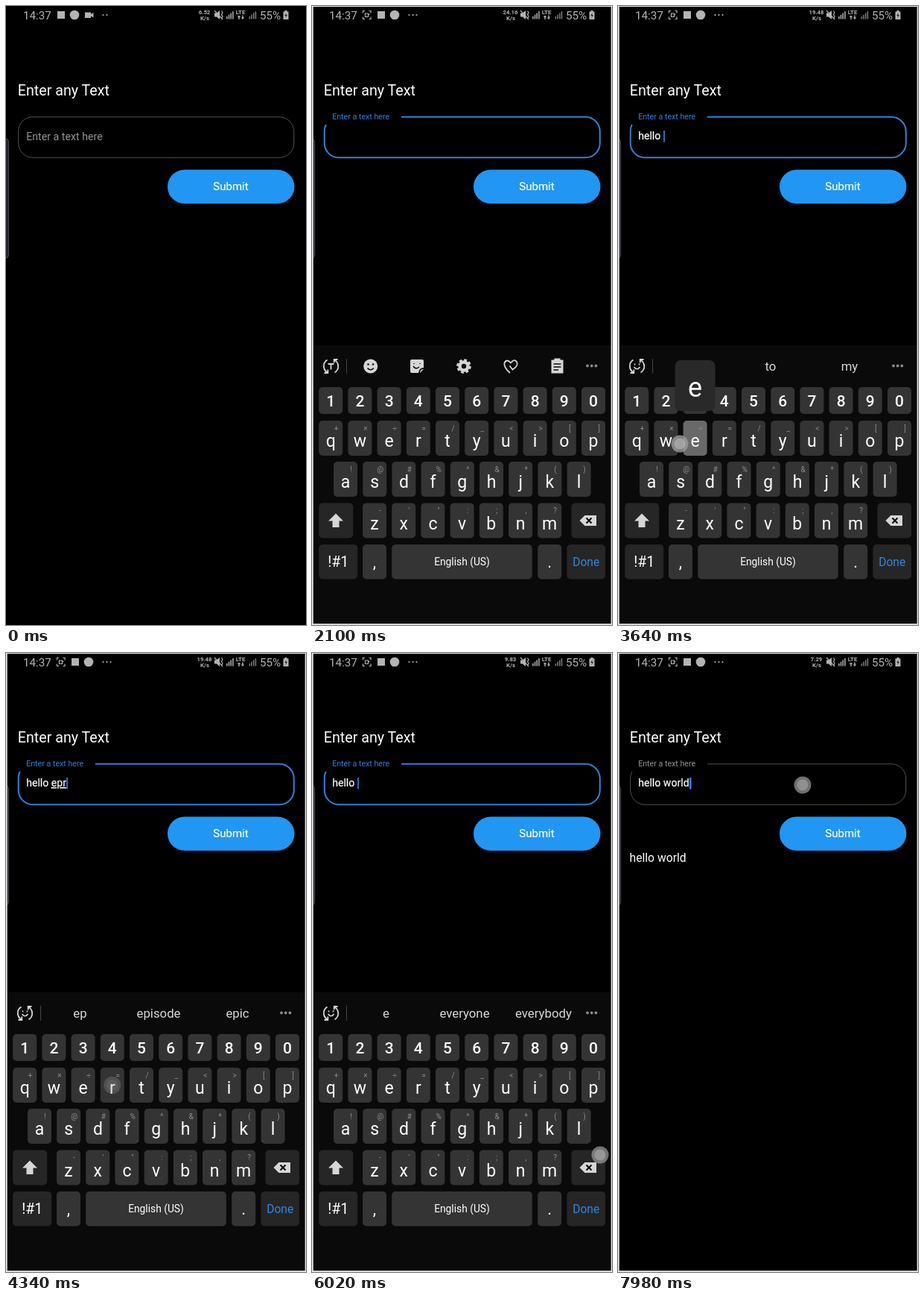
Write an HTML page that moves like this. It is 403 px wide and 830 px high and loops after 8000 ms.

```html
<!DOCTYPE html>
<html lang="en">
<head>
<meta charset="utf-8">
<title>Text field</title>
<style>
  html, body { margin: 0; width: 100%; height: 100%; overflow: hidden; background: #000; }
  svg { display: block; width: 100%; height: 100%; }
  text { font-family: Roboto, sans-serif; fill: #fff; }
  .mid { text-anchor: middle; }
  .status { fill: #b4b4b4; }
  .status text { fill: #b4b4b4; }
  .tiny { font-size: 7.8px; font-weight: 700; text-anchor: middle; }
  .line { fill: none; stroke: #d6d6d6; stroke-width: 1.8; }
  .icons { fill: #d6d6d6; }
  .dark { fill: none; stroke: #0b0b0b; stroke-width: 1.6; }
</style>
</head>
<body>
<svg viewBox="0 0 403 830" preserveAspectRatio="none">
  <rect width="403" height="830"/>
  <rect x="-6" y="178" width="9.5" height="160" rx="4" fill="#24242a" stroke="#4a4a52"/>

  <g class="status">
    <text x="23" y="17.5" font-size="15.2">14:37</text>
    <g id="statusEarly">
      <rect x="69" y="7" width="10" height="10"/>
      <circle cx="92" cy="12" r="6.3"/>
      <path d="M106 8.5h8v2.5l3.5-2v6.5l-3.5-2v2.5h-8z"/>
      <circle cx="130.5" cy="12" r="1.1"/><circle cx="135.5" cy="12" r="1.1"/>
    </g>
    <g id="statusLate">
      <path d="M71 6.5h-2.5v3M76.5 6.5h2.5v3M71 17.5h-2.5v-3M76.5 17.5h2.5v-3M71.5 10h4v4.5h-4zM75.5 12l2-1" fill="none" stroke="#b4b4b4" stroke-width="1.2"/>
      <rect x="88" y="7" width="10" height="10"/>
      <circle cx="111" cy="12" r="6.3"/>
      <circle cx="130.5" cy="12" r="1.1"/><circle cx="135.5" cy="12" r="1.1"/><circle cx="140.5" cy="12" r="1.1"/>
    </g>
    <text id="speed" class="tiny" x="266.5" y="11"></text>
    <text class="tiny" x="267" y="18.5">K/s</text>
    <path d="M280 9.5h3l4-3.5v12l-4-3.5h-3z"/>
    <path d="M280 6l11 12M289.5 6.5l1.5 2.5-1.5 2.5 1.5 2.5-1.5 3" fill="none" stroke="#b4b4b4" stroke-width="1.2"/>
    <text class="tiny" x="315" y="10.5">LTE</text>
    <path d="M313 12.5l2.2 2.5h-1.5v3h-1.4v-3h-1.5zM318 18l2.2-2.5h-1.5v-3h-1.4v3h-1.5z"/>
    <g id="signals"></g>
    <text x="341" y="17.5" font-size="15.2">55%</text>
    <path d="M374.5 6h3v1.5h2v10.5h-7v-10.5h2z"/>
    <path d="M376.8 9l-2.5 4h1.8l-.8 3.2 2.6-4.2h-1.8z" fill="#111"/>
  </g>

  <text x="15.7" y="119.5" font-size="19.7">Enter any Text</text>
  <path id="outline" fill="none"/>
  <text id="label">Enter a text here</text>
  <text y="179" x="27.2" font-size="14.1" stroke="#fff" stroke-width=".2"><tspan id="plain"></tspan><tspan id="composing" text-decoration="underline"></tspan></text>
  <rect id="caret" y="167" height="15.5" fill="#2f80e0"/>
  <rect x="217" y="219.5" width="170.5" height="45.5" rx="22.75" fill="#2196f3"/>
  <text class="mid" x="302" y="247.2" font-size="15" stroke="#fff" stroke-width=".2">Submit</text>
  <text id="result" x="15.5" y="279.5" font-size="15.7">hello world</text>

  <g id="keyboard">
    <rect y="455" width="403" height="375" fill="#0a0a0a"/>
    <g id="keys"></g>
    <g class="icons">
      <path d="M32 680.5l-10 10h5.5v8.5h9v-8.5h5.5z"/>
      <path d="M366.5 683h15.5v14h-15.5l-7-7z"/>
      <path class="dark" d="M368.5 686.5l7 7m0-7l-7 7" style="stroke-width:2"/>
      <path class="line" d="M20.5 474.5a9.8 9.8 0 0 0 .5 17M16.5 492h4.8v-4.5M30.5 491.5a9.8 9.8 0 0 0-.5-17M34.5 474h-4.8v4.5"/>
      <rect x="46" y="473" width="1" height="20" fill="#444"/>
      <g fill="#8a8a8a"><circle cx="370" cy="482.5" r="1.9"/><circle cx="375.7" cy="482.5" r="1.9"/><circle cx="381.4" cy="482.5" r="1.9"/></g>
      <g id="toolbar">
        <path class="line" d="M21.5 480h8M25.5 480v7.5"/>
        <circle cx="78.7" cy="483" r="9.5"/>
        <g fill="#0b0b0b"><circle cx="75.5" cy="480.5" r="1.3"/><circle cx="82" cy="480.5" r="1.3"/></g>
        <path class="dark" d="M74.5 485.5q4.2 4.5 8.4 0"/>
        <path d="M134 474h14q2 0 2 2v9q-6 0-7 7h-9q-2 0-2-2v-14q0-2 2-2zM145 492q0-5 5-5z"/>
        <path class="dark" d="M136 483q3.5 5 8 1M137 479v1M145 479v1"/>
        <circle cx="204" cy="483" r="5.5" fill="none" stroke="#d6d6d6" stroke-width="4.5"/>
        <circle cx="204" cy="483" r="8.3" fill="none" stroke="#d6d6d6" stroke-width="3" stroke-dasharray="3.7 2.82"/>
        <path class="line" d="M266 492q-9-8-7.5-13.5q3-6 8.5 0q4.5-6 8-1.5q3 5-5.5 10.5l-4-5"/>
        <path d="M321.500 474.500h4v-2h8v2h4v18h-16z"/>
        <path class="dark" d="M324.500 480h10M324.500 484h10M324.500 488h6.500"/>
      </g>
      <g id="suggestions">
        <path class="line" d="M21.5 484q4 5.5 8 0M22.5 479.5v2M28.5 479.5v2" style="stroke-width:1.6"/>
        <text class="mid" x="99.5" y="489" font-size="16.8"></text>
        <text class="mid" x="205" y="489" font-size="16.8"></text>
        <text class="mid" x="311" y="489" font-size="16.8"></text>
      </g>
    </g>
    <g id="popup">
      <rect x="-27" y="-81" width="54" height="68" rx="8" fill="#292929"/>
      <text class="mid" y="-32" font-size="36"></text>
    </g>
  </g>

  <g id="touch">
    <circle r="11.5" fill="#9c9c9c" opacity=".8"/>
    <circle r="7.5" fill="#c4c4c4" opacity=".5"/>
  </g>
  <path id="edge" d="M0 0H403V830H0zM1.7 1V828.3H401.7V1z" fill="#e6e6e6" fill-rule="evenodd"/>
</svg>

<script>
const LOOP = 8000, COMMIT = 70, SUGGEST_LAG = 120;
const FOCUS = 950, SUBMIT = 7320, REFOCUS = 7930;
const BLUE = [47, 130, 218];
const $ = id => document.getElementById(id);
const clamp = v => Math.max(0, Math.min(1, v));
const ramp = (t, a, b) => clamp((t - a) / (b - a));
const smooth = (t, a, b) => { const p = ramp(t, a, b); return p * p * (3 - 2 * p); };
const lerp = (a, b, p) => a + (b - a) * p;
const mix = (a, b, p) => `rgb(${a.map((v, i) => Math.round(lerp(v, b[i], p)))})`;
const show = (el, on) => el.setAttribute('visibility', on ? 'inherit' : 'hidden');
const set = (el, attrs) => { for (const k in attrs) el.setAttribute(k, attrs[k]); };

function add(parent, tag, attrs, text = '') {
  const el = document.createElementNS('http://www.w3.org/2000/svg', tag);
  set(el, attrs);
  el.textContent = text;
  parent.append(el);
  return el;
}

// Keyboard
const keys = {};
function addKey(name, x, y, w, h, fill, label, size, baseline, hint) {
  const rect = add($('keys'), 'rect', { x, y, width: w, height: h, rx: 5, fill });
  const cx = x + w / 2;
  if (label) add($('keys'), 'text', {
    x: cx, y: y + baseline, class: 'mid', 'font-size': size,
    'font-weight': /^\d$/.test(label) ? 500 : 400,
    style: name === 'done' ? 'fill:#3186dc' : ''
  }, label);
  if (hint) add($('keys'), 'text', { x: x + 23.5, y: y + 13.5, class: 'mid', 'font-size': 10, style: 'fill:#8c8c8c' }, hint);
  keys[name] = { rect, fill, cx, y, cy: y + h / 2 };
}
const LIGHT = '#343434', DARK = '#262626';
function addRow(chars, x, y, h, size, baseline, hints = '') {
  [...chars].forEach((c, i) => addKey(c, x + 39.2 * i, y, 32, h, LIGHT, c, size, baseline, hints[i]));
}
addRow('1234567890', 9.2, 511, 36, 21, 25.5);
addRow('qwertyuiop', 9.2, 556, 47, 23, 35, '+×÷=/_<>[]');
addRow('asdfghjkl', 29, 611, 47, 23, 35, '!@#%^&*()');
addRow('zxcvbnm', 68, 666.5, 47, 23, 35, '-\'":;,?');
addKey('shift', 9.2, 666.5, 46, 47, DARK);
addKey('back', 348.5, 666.5, 45.5, 47, DARK);
addKey('sym', 9.2, 722, 52, 46.5, DARK, '!#1', 19.6, 30);
addKey(',', 68, 722, 32, 46.5, LIGHT, ',', 22, 30.5);
addKey(' ', 107.2, 722, 188.6, 46.5, LIGHT, 'English (US)', 13.8, 28);
addKey('.', 303.2, 722, 32, 46.5, LIGHT, '.', 22, 31);
addKey('done', 342.4, 722, 51.6, 46.5, DARK, 'Done', 15.6, 28.5);

for (const [x, fill] of [[296, '#aaa'], [326.5, '#777']])
  for (let i = 0; i < 4; i++) {
    const height = 3.5 + 2.3 * i;
    add($('signals'), 'rect', { x: x + 2.7 * i, y: 17.5 - height, width: 1.6, height, fill });
  }

// Taps: time, key (if any), point (if off the key's centre)
const taps = [
  [898, '', 173, 163],
  [2300, 'h'], [2530, 'e'], [2760, 'l'], [2960, 'l'], [3170, 'o'], [3400, ' ', 190, 742],
  [3620, 'e', 83, 587], [3900, 'p'], [4200, 'r'], [4500, 'p'], [4810, 'd', 143, 624],
  ...[5150, 5350, 5550, 5750, 5940].map(t => [t, 'back', 387, 673]),
  [6220, 'w'], [6400, 'o'], [6560, 'r'], [6720, 'l'], [6880, 'd'],
  [7250, '', 300, 243], [7985, '', 248, 177]
].map(([time, key, x, y]) => ({ time, key, x: x ?? keys[key].cx, y: y ?? keys[key].cy }));

// An asterisk marks the word offered as a correction
const words = {
  'h': 'h have how', 'he': 'he hey hello', 'hel': 'hel hello help',
  'hell': 'hell hello hell', 'hello': 'hello hellos hello', '': 'I to my',
  'e': 'e everyone everybody', 'ep': 'ep episode epic', 'epr': 'epr *per pre',
  'eprp': 'eprp *perp peep', 'eprpd': 'eprpd *perpd peeped',
  'w': 'w what with', 'wo': 'wo would work', 'wor': 'wor work world',
  'worl': 'worl *world works', 'world': 'world worlds world'
};
const speeds = [[0, '6.52'], [560, '9.48'], [1700, '24.16'], [3150, '19.48'], [4700, '9.83'], [7400, '7.29']];

function textAt(t) {
  return taps.reduce((s, { time, key }) =>
    !key || time + COMMIT > t ? s : key === 'back' ? s.slice(0, -1) : s + key, '');
}
const lastWord = s => s.slice(s.lastIndexOf(' ') + 1);

function drawField(t) {
  const float = smooth(t, FOCUS, FOCUS + 200);
  const focus = ramp(t, FOCUS, FOCUS + 100) * (1 - ramp(t, SUBMIT, SUBMIT + 160));
  const start = lerp(34, 120, float);
  const tail = float ? 'A19.5 19.5 0 0 1 18.8 159' : 'A19.5 19.5 0 0 1 36 148.5Z';
  set($('outline'), {
    d: `M${float ? start : 36} 148.8H367.5A19.5 19.5 0 0 1 386.8 168V184A19.5 19.5 0 0 1 367.5 203.3H36A19.5 19.5 0 0 1 16.7 184V168${tail}`,
    stroke: mix([82, 82, 82], BLUE, focus), 'stroke-width': 1 + focus
  });
  set($('label'), {
    x: 27.2, y: lerp(179.5, 152, float), 'font-size': lerp(14.2, 10.65, float),
    style: `fill:${mix([148, 148, 148], BLUE, focus)}`
  });

  const text = textAt(t), submitted = t >= SUBMIT;
  const word = submitted ? '' : lastWord(text);
  $('plain').textContent = text.slice(0, text.length - word.length).replaceAll(' ', '\u00a0');
  $('composing').textContent = word;
  const resets = [FOCUS, 1550, REFOCUS, ...taps.filter(p => p.key).map(p => p.time + COMMIT)];
  const since = Math.max(...resets.filter(r => r <= t));
  const width = text ? $('plain').parentNode.getComputedTextLength() : 0;
  set($('caret'), { x: 27.5 + width, width: submitted ? 2.6 : 1.7 });
  show($('caret'), t >= FOCUS && (!submitted || t >= REFOCUS) && (t - since) % 1000 < 500);
  show($('result'), submitted);
}

function drawKeyboard(t) {
  const up = smooth(t, 1350, 1650) * (1 - smooth(t, 7380, 7620));
  $('keyboard').setAttribute('transform', `translate(0 ${(1 - up) * 375})`);
  show($('keyboard'), up > 0);

  const hintText = textAt(t - SUGGEST_LAG);
  show($('toolbar'), !hintText);
  show($('suggestions'), hintText);
  const options = words[lastWord(hintText)].split(' ');
  $('suggestions').querySelectorAll('text').forEach((el, i) => {
    el.textContent = options[i].replace('*', '');
    el.style.fill = options[i][0] === '*' ? '#2f86e4' : '#d8d8d8';
  });

  const pressed = taps.find(p => p.key && t >= p.time && t < p.time + COMMIT)?.key;
  for (const name in keys) keys[name].rect.setAttribute('fill', name === pressed ? '#696969' : keys[name].fill);
  const letter = pressed && /^[a-z]$/.test(pressed);
  show($('popup'), letter);
  if (letter) {
    $('popup').setAttribute('transform', `translate(${keys[pressed].cx} ${keys[pressed].y})`);
    $('popup').querySelector('text').textContent = pressed;
  }
}

function drawTouch(t) {
  const tap = taps.find(p => t >= p.time - 40 && t < p.time + 180);
  show($('touch'), tap);
  if (!tap) return;
  const dt = t - tap.time;
  set($('touch'), {
    transform: `translate(${tap.x} ${tap.y})`,
    opacity: ramp(dt, -40, 0) * (1 - ramp(dt, 70, 180))
  });
}

function draw(t) {
  show($('edge'), t >= 70);
  show($('statusEarly'), t < 280);
  show($('statusLate'), t >= 280);
  $('speed').textContent = speeds.findLast(([from]) => t >= from)[1];
  drawField(t);
  drawKeyboard(t);
  drawTouch(t);
}

const begin = performance.now();
function tick() {
  draw((performance.now() - begin) % LOOP);
  requestAnimationFrame(tick);
}
tick();
</script>
</body>
</html>
```
